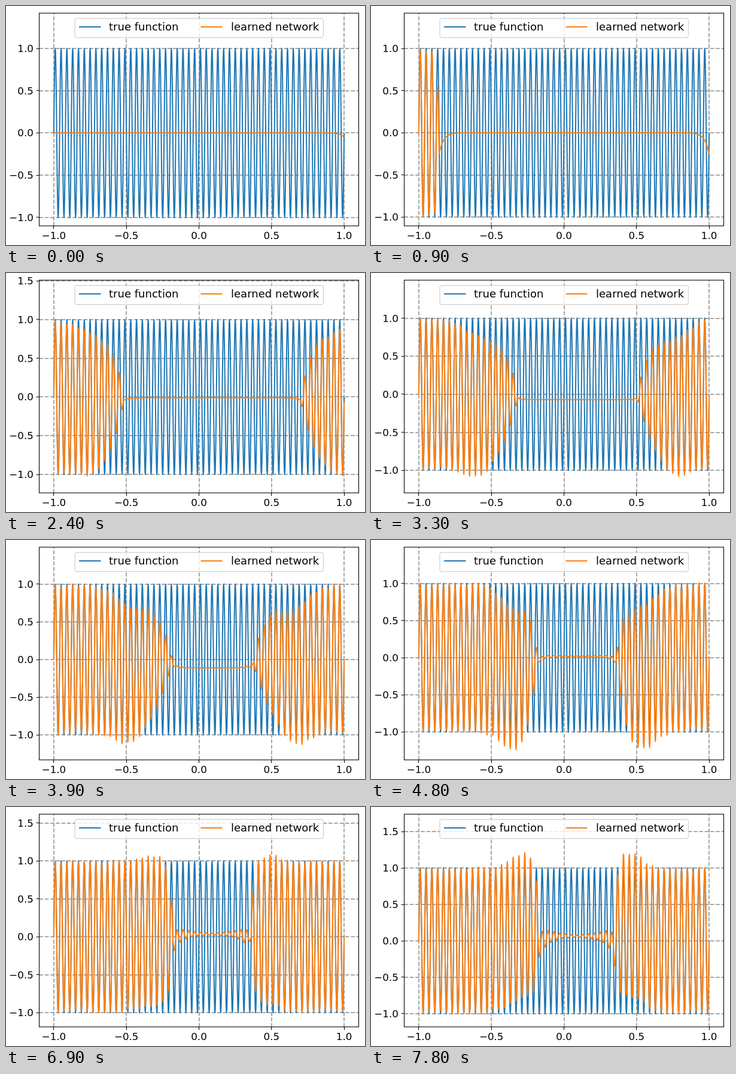
These frames come from a looping animation (600 px wide and 400 px high, 8 s). An HTML page:

```html
<!DOCTYPE html>
<html lang="en">
<head>
<meta charset="utf-8">
<title>Learning a sine wave</title>
<style>
  html, body { margin: 0; width: 100%; height: 100%; overflow: hidden; background: #fff; }
  svg { display: block; width: 600px; height: 400px; }
  text { font-family: "DejaVu Sans", sans-serif; font-size: 16.67px; }
  .legend text { font-size: 18.05px; }
  .wave { fill: none; stroke-width: 2; stroke-linejoin: round; }
  .true { stroke: #1f77b4; }
  .net { stroke: #ff7f0e; }
  .grid { fill: none; stroke: #9c9c9c; stroke-width: 1.75; stroke-dasharray: 6.5 2.8; }
  .frame { fill: none; stroke: #000; stroke-width: 1.1; }
</style>
</head>
<body>
<svg viewBox="0 0 600 400">
  <clipPath id="area"><rect x="55.5" y="12" width="534" height="356"/></clipPath>
  <path class="grid" id="grid"/>
  <g clip-path="url(#area)">
    <path class="wave true" id="truth"/>
    <path class="wave net" id="net"/>
  </g>
  <rect class="frame" x="55.5" y="12" width="534" height="356"/>
  <path class="frame" id="ticks"/>
  <g id="labelsX" text-anchor="middle"></g>
  <g id="labelsY" text-anchor="end"></g>
  <g class="legend">
    <rect x="115" y="20.7" width="415.5" height="32" rx="3.6" fill="#fff" fill-opacity=".8" stroke="#ccc" stroke-opacity=".8" stroke-width="1.4"/>
    <path class="wave true" d="M122 35H158.5"/>
    <text x="172" y="41">true function</text>
    <path class="wave net" d="M325.5 35H361.5"/>
    <text x="376" y="41">learned network</text>
  </g>
</svg>
<script>
const LOOP = 8000, STEP = 300, SAMPLES = 1000;
const BOX = { left: 55.5, right: 589.5, top: 12, bottom: 368 };
const $ = id => document.getElementById(id);
const mix = (a, b, p) => a + (b - a) * p;
const px = x => 322.5 + 242.6 * x;
const sine = x => Math.sin(50 * Math.PI * (x + 1));

// Stages of training. The wave is learned outside [left, right] and grows
// over the distance rise; level and edge shape the flat part between,
// leak is the wave already showing there.
const stages = [
  { step: 0, min: -1, max: 1, left: -1.3, right: 1, rise: .01, level: 0, edge: -.05, leak: 0 },
  { step: 3, min: -1.005, max: 1, left: -.86, right: 1, rise: .01, level: 0, edge: -.25, leak: 0 },
  { step: 7, min: -1.13, max: 1.053, left: -.515, right: .7, rise: .09, level: -.01, edge: -.03, leak: 0 },
  { step: 12, min: -1.221, max: 1.023, left: -.18, right: .37, rise: .12, level: -.11, edge: .04, leak: .01 },
  { step: 15, min: -1.262, max: 1.013, left: -.18, right: .36, rise: .05, level: .02, edge: -.07, leak: .03 },
  { step: 19, min: -1.087, max: 1.05, left: -.18, right: .36, rise: .03, level: .01, edge: -.08, leak: .1 },
  { step: 25, min: -1.065, max: 1.254, left: -.165, right: .34, rise: .02, level: .065, edge: -.12, leak: .16 }
];

function stageAt(step) {
  const i = Math.max(1, stages.findIndex(s => s.step >= step));
  const a = stages[i - 1], b = stages[i];
  const p = (step - a.step) / (b.step - a.step);
  return Object.fromEntries(Object.keys(a).map(k => [k, mix(a[k], b[k], p)]));
}

// Fixed pseudo-random unevenness of each half wave.
function ripple(h) {
  const r = Math.sin(h * 12.9898 + 4.1) * 43758.5453;
  return 1.01 - .05 * (r - Math.floor(r));
}

function network(s) {
  const depth = x => Math.max(s.left - x, x - s.right);
  const growth = d => 1 - Math.exp(-d / s.rise);
  const bias = 1.2 * (s.min + s.max), center = .06 + 1.8 * s.rise;

  const amps = Array.from({ length: 100 }, (_, h) => {
    const d = depth(-.99 + .02 * h);
    return d > 0 ? growth(d) * ripple(h) : s.leak * Math.exp(d / .1);
  });
  const drift = d => d <= 0
    ? s.level + s.edge * Math.exp(d / .03)
    : (s.level + s.edge) * Math.exp(-d / .01)
      + bias * growth(d) * Math.exp(-(((d - center) / .14) ** 2));

  return x => {
    const h = Math.min(99, Math.floor((x + 1) * 50 + 1e-9));
    return sine(x) * amps[h] + drift(depth(x));
  };
}

function plot(f, py) {
  let d = "";
  for (let i = 0; i <= SAMPLES; i++) {
    const x = -1 + 2 * i / SAMPLES;
    d += (i ? "L" : "M") + px(x).toFixed(2) + " " + py(f(x)).toFixed(2);
  }
  return d;
}

const snap = v => Math.floor(v) + .5;
const label = (v, x, y) =>
  `<text x="${x}" y="${y}">${v.toFixed(1).replace("-", "\u2212")}</text>`;

function draw(step) {
  const s = stageAt(step);
  const range = s.max - s.min;
  const lo = s.min - .05 * range, hi = s.max + .209 * range;
  const py = y => mix(BOX.top, BOX.bottom, (hi - y) / (hi - lo));

  let grid = "", ticks = "", labelsX = "", labelsY = "";
  for (let v = -1; v <= 1; v += .5) {
    const x = px(v);
    grid += `M${Math.round(x)} ${BOX.bottom}V${BOX.top}`;
    ticks += `M${snap(x)} ${BOX.bottom}v4.9`;
    labelsX += label(v, x, 390);
  }
  for (let v = -1; v <= hi; v += .5) {
    const y = py(v);
    grid += `M${BOX.left} ${Math.round(y)}H${BOX.right}`;
    ticks += `M${BOX.left} ${snap(y)}h-4.9`;
    labelsY += label(v, 45.8, Math.round(y + 6));
  }
  $("grid").setAttribute("d", grid);
  $("ticks").setAttribute("d", ticks);
  $("labelsX").innerHTML = labelsX;
  $("labelsY").innerHTML = labelsY;
  $("truth").setAttribute("d", plot(sine, py));
  $("net").setAttribute("d", plot(network(s), py));
}

let shown = -1;
function tick() {
  const n = Math.floor(performance.now() % LOOP / STEP);
  const step = n > 3 ? n - 1 : n; // one state is held twice as long
  if (step !== shown) draw(shown = step);
  requestAnimationFrame(tick);
}
tick();
</script>
</body>
</html>
```
